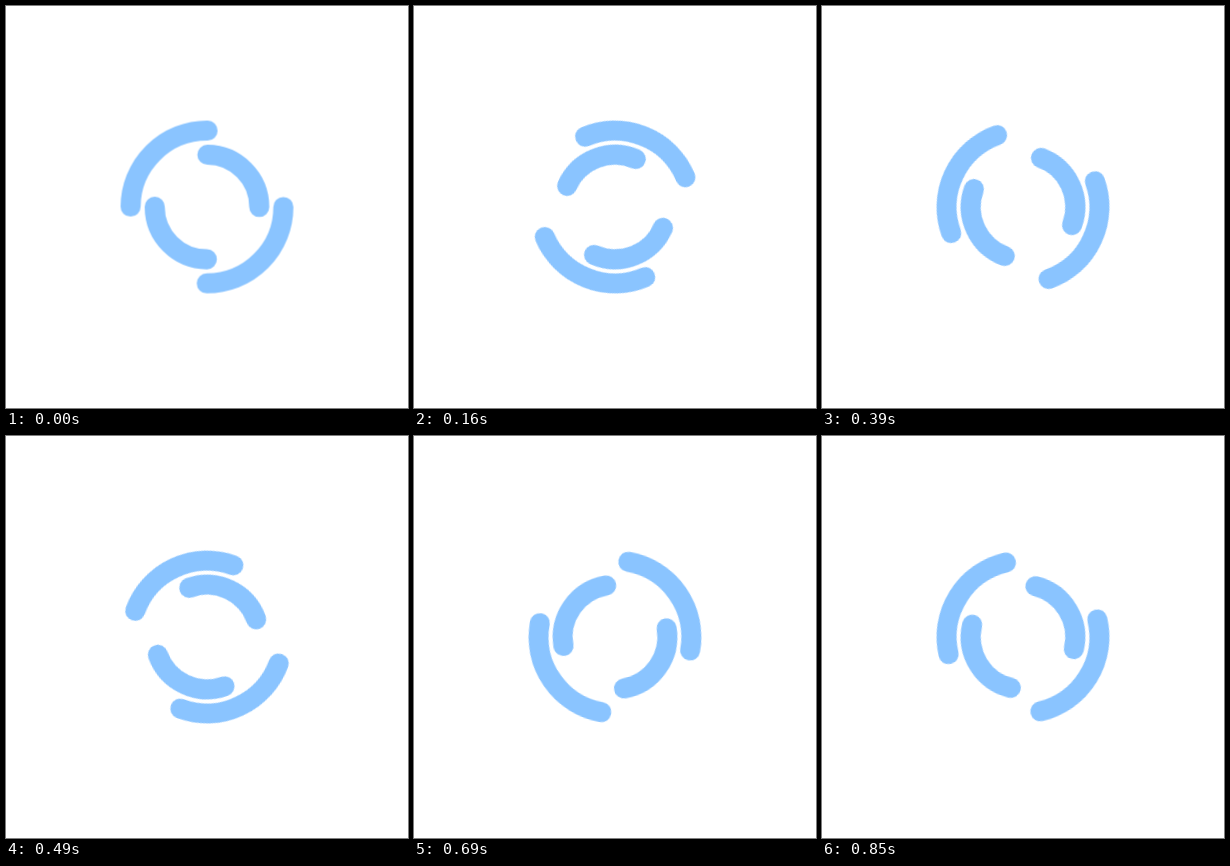
Animation, 402 px wide and 402 px high, one loop 0.88 s. Source, as an HTML page:

```html
<!DOCTYPE html>
<html lang="en">
<head>
<meta charset="utf-8">
<title>Loading rings</title>
<style>
  html, body { margin: 0; width: 100%; height: 100%; overflow: hidden; background: #fff; }
  svg { display: block; width: 100vw; height: 100vh; }
  circle { fill: none; stroke: #8ac4ff; stroke-width: 5; stroke-linecap: round; transform-origin: 50px 50px; }
</style>
</head>
<body>
<svg viewBox="0 0 100 100">
  <circle id="outer" cx="50" cy="50" r="19"/>
  <circle id="inner" cx="50" cy="50" r="13"/>
</svg>
<script>
  const STEPS = 27;
  const LOOP = 880;
  const longSteps = [1, 5, 9, 12, 16, 20, 24]; // held 40 ms, the others 30 ms

  const startOf = n => 30 * n + 10 * longSteps.filter(s => s < n).length;

  function spin(id, direction, startQuarter) {
    const ring = document.getElementById(id);
    const quarter = ring.r.baseVal.value * Math.PI / 2;
    ring.style.strokeDasharray = `${quarter} ${quarter}`;
    ring.style.strokeDashoffset = startQuarter * quarter;

    const keyframes = Array.from({ length: STEPS + 1 }, (_, n) => ({
      offset: startOf(n) / LOOP,
      transform: `rotate(${direction * n * 360 / STEPS}deg)`,
      easing: 'step-end'
    }));
    return ring.animate(keyframes, { duration: LOOP, iterations: Infinity });
  }

  spin('outer', 1, 0);
  spin('inner', -1, 1);
</script>
</body>
</html>
```
